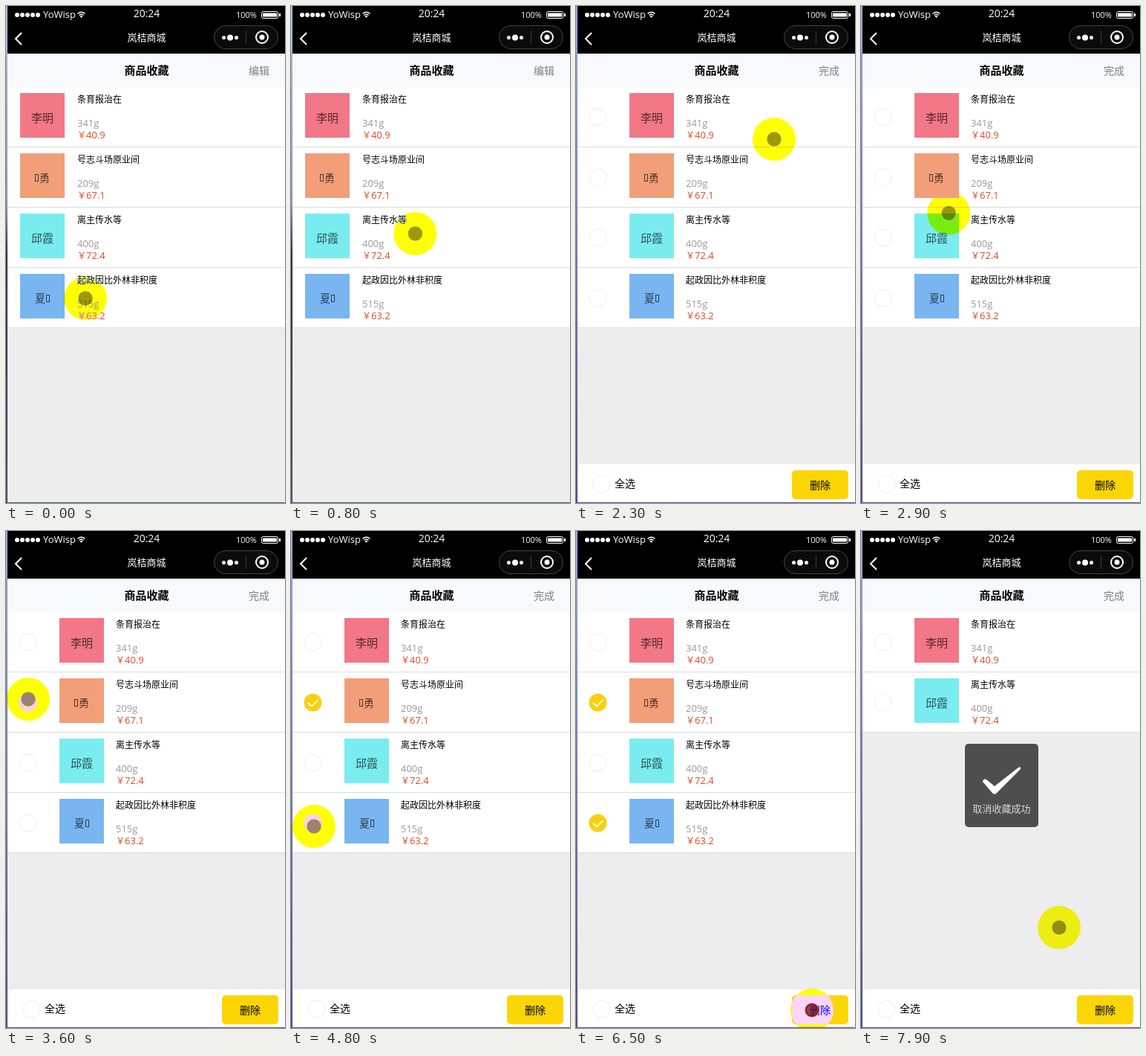
An HTML page for the animation above (8 s loop, 376 by 668 pixels).

```html
<!DOCTYPE html>
<html lang="zh">
<head>
<meta charset="utf-8">
<title>商品收藏</title>
<style>
  html, body { margin: 0; width: 100%; height: 100%; overflow: hidden; background: #ededed; }
  svg { display: block; width: 376px; height: 668px; font-family: "Open Sans", "Noto Sans CJK SC", "Noto Sans CJK", sans-serif; }
  .mid { text-anchor: middle; }
  .line { fill: none; stroke: #fff; stroke-width: 2; }
  .box { fill: #fff; stroke: #eeeef1; }
  #lens { mix-blend-mode: difference; }
</style>
</head>
<body>
<svg viewBox="0 0 376 668">
  <defs>
    <linearGradient id="edge" x2="0" y2="1">
      <stop offset="0" stop-color="#a9bedb"/>
      <stop offset=".4" stop-color="#8798b5"/>
      <stop offset=".5" stop-color="#2c3348"/>
      <stop offset="1" stop-color="#4a536e"/>
    </linearGradient>
    <linearGradient id="edgeEdit" x2="0" y2="1">
      <stop offset="0" stop-color="#98a6d6"/>
      <stop offset="1" stop-color="#4c4f92"/>
    </linearGradient>
  </defs>
  <rect width="376" height="668" fill="#ededed"/>

  <rect width="376" height="64"/>
  <g id="signal" fill="#fff"></g>
  <g fill="#fff">
    <text x="50" y="15.500" font-size="13">YoWisp</text>
    <text class="mid" x="189.5" y="15" font-size="14" font-weight="500">20:24</text>
    <text x="310" y="16" font-size="11" font-weight="500">100%</text>
    <text class="mid" x="189.5" y="47" font-size="13">岚桔商城</text>
    <path d="M99.500 13.500 L101.500 16 L103.500 13.500 Q101.500 12 99.500 13.500"/>
    <rect x="346" y="9.500" width="19" height="5"/>
    <rect x="368" y="10" width="2" height="4"/>
  </g>
  <path d="M96.500 10.500 Q101.500 6 106.500 10.500 M98.500 12.500 Q101.500 9.500 104.500 12.500" class="line" style="stroke-width:1.300"/>
  <rect x="344.500" y="7.500" width="22" height="9" rx="2" class="line" style="stroke-width:1"/>
  <path d="M21 36 L13 44 L21 52" class="line"/>
  <rect x="280.500" y="26.500" width="86" height="31" rx="15.500" fill="#0b0b0b" stroke="#444"/>
  <path d="M323.500 33 V51" stroke="#3a3a3a"/>
  <g fill="#fff">
    <circle cx="293.500" cy="42.500" r="2.500"/><circle cx="302" cy="42.500" r="4"/><circle cx="310.500" cy="42.500" r="2.500"/>
    <circle cx="345" cy="42" r="3.500"/>
  </g>
  <circle cx="345" cy="42" r="8" class="line"/>

  <rect y="64" width="376" height="45" fill="#f8f9fd"/>
  <text class="mid" x="189.500" y="91.500" font-size="15" font-weight="700">商品收藏</text>
  <text id="mode" x="327" y="92" font-size="14" fill="#808080">编辑</text>

  <g id="list"></g>

  <g id="bar">
    <rect y="616" width="376" height="52" fill="#fff"/>
    <circle cx="34.500" cy="642.500" r="11.500" class="box"/>
    <text x="52" y="647" font-size="14">全选</text>
    <rect x="291" y="624" width="76" height="39" rx="5" fill="#fcd505"/>
    <text class="mid" x="329" y="649" font-size="14">删除</text>
  </g>

  <g id="toast">
    <rect x="140" y="286" width="99" height="112" rx="5" fill="#000" fill-opacity=".67"/>
    <path d="M164 337 Q165 332 169 334 L180 343 L212 318 Q216 316 215 320 L183 352 Q180 355 177 352 Z" fill="#fff"/>
    <text class="mid" x="189.500" y="378" font-size="13" fill="#d8d8d8">取消收藏成功</text>
  </g>

  <path id="strip" d="M0 0 H2 V667 H376 V668 H0 Z" fill="url(#edge)"/>

  <circle id="lens" r="29" fill="#00f"/>
  <g id="dot">
    <circle r="10" fill="#2a2000" fill-opacity=".46" stroke="#fff" stroke-opacity=".4"/>
    <circle id="press" r="8" fill="#700" fill-opacity=".45" stroke="#a01018" stroke-width="2"/>
  </g>
</svg>
<script>
const LOOP = 8000, STEP = 100, ROW = 81;
const EDIT_AT = 1800, DELETE_AT = 7700;
const $ = id => document.getElementById(id);

// name, weight, price, thumbnail colour, thumbnail label (_ is a missing glyph), time of selection
const items = [
  ['条育报治在', '341g', '40.9', '#f27787', '李明'],
  ['号志斗场原业间', '209g', '67.1', '#f29e79', '_勇', 3500],
  ['离主传水等', '400g', '72.4', '#79ecf0', '邱霞'],
  ['起政因比外林非积度', '515g', '63.2', '#79b5f0', '夏_', 4700]
];

// time, x, y of the pointer
const route = [
  [0, 107, 393], [400, 107, 393], [900, 190, 275], [1300, 303, 131],
  [1500, 331, 99], [2000, 331, 99], [2300, 267, 179], [2700, 170, 285],
  [3100, 68, 262], [3300, 30, 226], [3700, 30, 226], [3850, 88, 330],
  [4000, 84, 420], [4400, 31, 397], [4900, 31, 397], [5200, 110, 320],
  [5400, 210, 290], [5600, 320, 380], [5800, 420, 500], [5900, 420, 560],
  [6000, 385, 590], [6300, 318, 644], [6600, 318, 644], [6800, 286, 579],
  [7000, 267, 533], [8000, 267, 533]
];

function label(text) {
  const at = text.indexOf('_');
  if (at < 0) return `<text class="mid" x="30" y="38.5" font-size="15">${text}</text>`;
  return `<text x="${at ? 20 : 26}" y="38" font-size="14">${text.replace('_', '')}</text>
    <rect x="${at ? 35.5 : 20.5}" y="28.5" width="4" height="9" fill="none" stroke="#000"/>`;
}

$('signal').innerHTML = [0, 1, 2, 3, 4].map(i => `<circle cx="${15 + 7 * i}" cy="12" r="3"/>`).join('');

$('list').innerHTML = items.map(([name, weight, price, color, tag]) => `
  <g class="row">
    <rect width="376" height="80" fill="#fff"/>
    <rect y="80" width="376" height="1" fill="#dcdcdc"/>
    <g class="off"><circle cx="29.5" cy="40.5" r="11.500" class="box"/></g>
    <g class="on">
      <circle cx="29.5" cy="40.5" r="12" fill="#f9d010"/>
      <path d="M23 41 L28 45.500 L36.500 37" class="line" style="stroke-width:1.700"/>
    </g>
    <g class="thumb">
      <rect width="60" height="60" fill="${color}"/>
      <g opacity=".65">${label(tag)}</g>
    </g>
    <g class="info">
      <text y="21" font-size="12">${name}</text>
      <text y="53" font-size="13" fill="#999">${weight}</text>
      <text y="69" font-size="13" fill="#dc4a22"><tspan font-size="12">￥</tspan>${price}</text>
    </g>
  </g>`).join('');

const rows = [...document.querySelectorAll('.row')].map(el => ({
  el, ...Object.fromEntries(['off', 'on', 'thumb', 'info'].map(k => [k, el.querySelector('.' + k)]))
}));

const show = (el, visible) => el.setAttribute('visibility', visible ? 'visible' : 'hidden');
const move = (el, x, y) => el.setAttribute('transform', `translate(${x} ${y})`);

// Slope at a waypoint; zero next to a rest so the pointer never overshoots
function slope(i, axis) {
  const a = route[i - 1], b = route[i], c = route[i + 1];
  if (!a || !c || (b[axis] - a[axis]) * (c[axis] - b[axis]) <= 0) return 0;
  return (c[axis] - a[axis]) / (c[0] - a[0]);
}

function pointer(t, axis) {
  const i = route.findIndex(p => p[0] > t) - 1;
  const [a, b] = [route[i], route[i + 1]];
  const span = b[0] - a[0], u = (t - a[0]) / span, v = 1 - u;
  return a[axis] * (1 + 2 * u) * v * v + b[axis] * u * u * (3 - 2 * u)
    + span * u * v * (slope(i, axis) * v - slope(i + 1, axis) * u);
}

function draw(now) {
  const t = Math.floor(now % LOOP / STEP) * STEP;
  const editing = t >= EDIT_AT, deleted = t >= DELETE_AT;

  let place = 0;
  rows.forEach((row, i) => {
    const pickedAt = items[i][5];
    const gone = deleted && pickedAt;
    const picked = pickedAt && t >= pickedAt;
    row.el.style.display = gone ? 'none' : '';
    show(row.on, editing && picked);
    show(row.off, editing && !picked);
    move(row.thumb, editing ? 72 : 19, 8);
    move(row.info, editing ? 148 : 96, 0);
    move(row.el, 0, 109 + ROW * place);
    if (!gone) place++;
  });

  $('mode').textContent = editing ? '完成' : '编辑';
  show($('bar'), editing);
  $('strip').setAttribute('fill', editing ? 'url(#edgeEdit)' : 'url(#edge)');
  $('toast').setAttribute('opacity', deleted ? Math.min(1, (t - DELETE_AT + 80) / 250) : 0);

  const x = pointer(t, 1), y = pointer(t, 2);
  move($('lens'), x, y);
  move($('dot'), x, y);
  show($('press'), t >= 6400 && t < 6600);
}

const start = performance.now();
function tick() {
  draw(performance.now() - start);
  requestAnimationFrame(tick);
}
tick();
</script>
</body>
</html>
```
